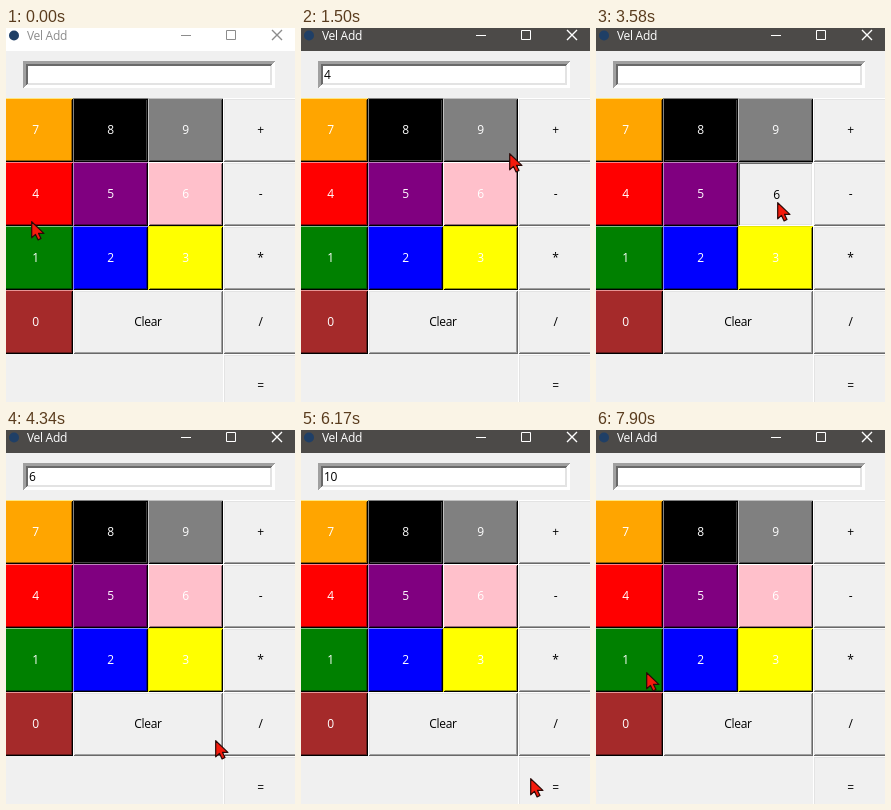
Animation, 289 px wide and 374 px high, one loop 8 s. Source, as an HTML page:

```html
<!DOCTYPE html>
<html lang="en">
<head>
<meta charset="utf-8">
<title>Vel Add</title>
<style>
  html, body { margin: 0; width: 100%; height: 100%; overflow: hidden; }
  #win {
    position: relative; width: 289px; height: 374px; overflow: hidden;
    background: #f0f0f0; color: #000; cursor: default; user-select: none;
    font: 12px "Open Sans", "Noto Sans", sans-serif; letter-spacing: -.3px;
  }
  #win div, #win svg { position: absolute; box-sizing: border-box; }

  #bar { left: 0; top: 0; width: 289px; height: 23px; background: #fff; color: #8c8c8c; }
  #bar.on { background: #4c4a48; color: #fff; }
  #bar svg { left: 0; top: 0; fill: none; stroke: currentColor; }
  #name { left: 21px; top: 0; line-height: 16px; white-space: pre; }

  #entry {
    left: 17px; top: 33px; width: 252px; height: 27px; padding-left: 6px;
    background: #fff; line-height: 27px; white-space: pre;
  }

  .key { width: 75px; height: 64px; line-height: 64px; text-align: center; box-shadow: var(--up); }
  .key span { position: relative; }
  .key.down { background: #f0f0f0 !important; color: #000 !important; box-shadow: var(--sunk); }
  .key.down span { left: 1px; top: 1px; }
</style>
</head>
<body>
<div id="win">
  <div id="bar">
    <svg width="289" height="23">
      <circle cx="8" cy="7.5" r="5" fill="#1f3f66" stroke="none"/>
      <path d="M175 7.5h10M220.5 2.5h9v9h-9z"/>
      <path d="M266 2l10 10M276 2l-10 10" stroke-width="1.4"/>
    </svg>
    <div id="name">Vel Add</div>
  </div>
  <div id="entry"></div>
  <svg id="arrow" width="16" height="21" style="left:0;top:0;z-index:2">
    <path d="M.7 .7V16.8L4.5 13.4L7.1 18.9L10 17.5L7.6 12.4H12.9Z"
      fill="#f51a0c" stroke="#2a0a08" stroke-width="1.2" stroke-linejoin="round"/>
  </svg>
</div>
<script>
const LOOP = 8000, TICK = 125, FOCUS = 570;
const $ = id => document.getElementById(id);

const ROWS = ["7 8 9 +", "4 5 6 -", "1 2 3 *", "0 Clear /", "=" ];
const FACES = {
  7: "orange", 8: "black", 9: "gray", 4: "red", 5: "purple",
  6: "pink", 1: "green", 2: "blue", 3: "yellow", 0: "brown"
};

const line = k => k;
const out = k => 1 - (1 - k) ** 2;
const into = k => k * k;
const smooth = k => k * k * (3 - 2 * k);

// pointer strokes: start, ticks, end point, easing in x and y
const START = { x: 25, y: 193 };
const STROKES = [
  { at: 150, n: 2, x: 38, y: 162, ex: out, ey: out },
  { at: 1220, n: 3, x: 208, y: 125, ex: out, ey: into },
  { at: 1630, n: 1, x: 221, y: 121, ex: line, ey: line },
  { at: 2300, n: 1, x: 247, y: 108, ex: line, ey: line },
  { at: 3060, n: 1, x: 211, y: 153, ex: line, ey: line },
  { at: 3210, n: 2, x: 181, y: 174, ex: line, ey: line },
  { at: 4090, n: 3, x: 209, y: 310, ex: into, ey: line },
  { at: 4465, n: 4, x: 250, y: 366, ex: out, ey: out },
  { at: 6170, n: 4, x: 166, y: 293, ex: line, ey: line },
  { at: 7370, n: 5, x: 50, y: 242, ex: smooth, ey: smooth }
];

// key presses and what the entry shows once the key is released
const PRESSES = [
  { down: 570, up: 840, key: "4", shows: "4" },
  { down: 2440, up: 2690, key: "+", shows: "" },
  { down: 3580, up: 3710, key: "6", shows: "6" },
  { down: 5150, up: 5400, key: "=", shows: "10" },
  { down: 6870, up: 6990, key: "Clear", shows: "" }
];

const rgb = c => `rgb(${c.map(Math.round)})`;

// nested one-pixel rings, outermost first, each [top-left, bottom-right]
const bevel = rings => rings.flatMap(([a, b], i) =>
  [`inset ${i + 1}px ${i + 1}px ${a}`, `inset ${-i - 1}px ${-i - 1}px ${b}`]).join();

const OUTER = ["#a0a0a0", "#fff"], INNER = ["#696969", "#e3e3e3"];

function raised(c) {
  const isBlack = Math.max(...c) === 0;
  const light = c[1] > 242 ? v => v * 0.9 : v => Math.max(Math.min(255, v * 1.4), (255 + v) / 2);
  const dark = isBlack ? () => 64 : v => v * 0.6;
  return bevel([[rgb(c.map(light)), "#000"], [rgb(c), rgb(c.map(dark))]]);
}

function makeKey(label, col, row) {
  const el = document.createElement("div");
  const face = FACES[label];
  el.className = "key";
  el.innerHTML = `<span>${label}</span>`;
  el.style.left = col * 75 - 8 + "px";
  el.style.top = 70 + row * 64 + "px";
  if (label === "Clear") el.style.width = "150px";
  el.style.background = face || "#f0f0f0";
  el.style.color = face ? "#fff" : "#000";
  $("win").append(el);
  const parts = getComputedStyle(el).backgroundColor.match(/\d+/g).map(Number);
  el.style.setProperty("--up", face ? raised(parts) : bevel([["#fff", "#696969"], ["#e3e3e3", "#a0a0a0"]]));
  return { label, el };
}

// the last key of every row sits in the operator column
const keys = ROWS.flatMap((text, row) => text.split(" ").map((label, i, all) =>
  makeKey(label, i === all.length - 1 ? 3 : i, row)));
$("win").style.setProperty("--sunk", bevel([OUTER, INNER]));
$("entry").style.boxShadow = bevel([OUTER, OUTER, OUTER, INNER, INNER]);

function pointer(t) {
  let p = START;
  for (const s of STROKES) {
    if (t < s.at) break;
    const k = Math.min(1, (Math.floor((t - s.at) / TICK) + 1) / s.n);
    p = { x: p.x + (s.x - p.x) * s.ex(k), y: p.y + (s.y - p.y) * s.ey(k) };
  }
  return p;
}

function draw(t) {
  const { x, y } = pointer(t);
  const held = PRESSES.find(p => t >= p.down && t < p.up)?.key;
  $("arrow").style.transform = `translate(${Math.round(x)}px, ${Math.round(y)}px)`;
  $("bar").classList.toggle("on", t >= FOCUS);
  $("entry").textContent = PRESSES.findLast(p => t >= p.up)?.shows ?? "";
  for (const { label, el } of keys) el.classList.toggle("down", label === held);
}

const start = performance.now();
function tick() {
  draw((performance.now() - start) % LOOP);
  requestAnimationFrame(tick);
}
tick();
</script>
</body>
</html>
```
